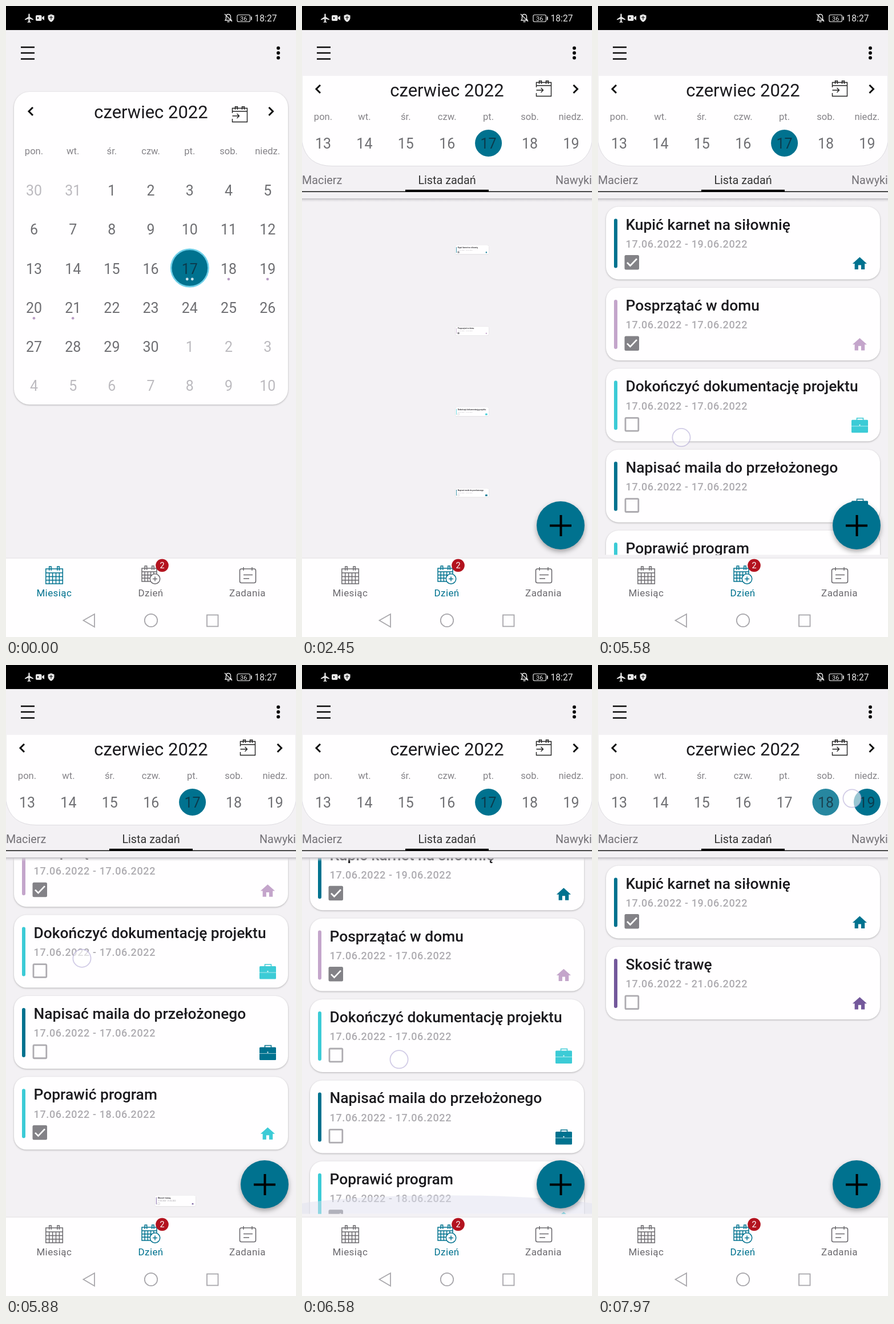
Animation of 508x1102 px, one loop 8 s. Source, as an HTML page:

```html
<!DOCTYPE html>
<html lang="pl">
<head>
<meta charset="utf-8">
<title>Kalendarz</title>
<style>
  html, body { margin: 0; width: 100%; height: 100%; overflow: hidden; background: #f3f1f4; }
  svg { display: block; width: 508px; height: 1102px; font-family: Roboto, "Noto Sans", sans-serif; }
  .c { text-anchor: middle; }
  .card { fill: #fffeff; filter: drop-shadow(0 1.5px 1.5px #0004); }
  .line { fill: none; stroke: currentColor; stroke-width: 1.5; }
  .title { font-weight: 500; }
  .date { font-weight: 500; letter-spacing: .65px; }
  .nav { letter-spacing: .4px; }
</style>
</head>
<body>
<svg id="stage" viewBox="0 0 508 1102"></svg>
<script>
const TEAL = '#00728f', CYAN = '#3ccbd6', MAUVE = '#c4a5cb', PURPLE = '#73589b';
const BG = '#f3f1f4', WHITE = '#fffeff', GREY = '#6f6f73', INK = '#0b3b4d';

const text = (x, y, s, size, fill, cls = 'c') =>
  `<text x="${x}" y="${y}" font-size="${size}" fill="${fill}" class="${cls}">${s}</text>`;
const rect = (x, y, w, h, fill, r = 0, more = '') =>
  `<rect x="${x}" y="${y}" width="${w}" height="${h}" rx="${r}" fill="${fill}" ${more}/>`;
const circle = (x, y, r, fill, more = '') => `<circle cx="${x}" cy="${y}" r="${r}" fill="${fill}" ${more}/>`;
const path = (d, more = 'class="line"') => `<path d="${d}" ${more}/>`;
const group = (id, body, more = '') => `<g id="${id}" ${more}>${body}</g>`;
const at = (x, y, body, k = 1) => `<g transform="translate(${x} ${y}) scale(${k})">${body}</g>`;
const stroke = (color, w) => `fill="none" stroke="${color}" stroke-width="${w}"`;

const WEEKDAYS = ['pon.', 'wt.', 'śr.', 'czw.', 'pt.', 'sob.', 'niedz.'];
const weekdays = (x, step, y) =>
  WEEKDAYS.map((d, i) => text(x + step * i, y, d, 16.6, '#858388')).join('');
const chevrons = (l, r, y) =>
  path(`M${l + 4} ${y - 7}l-7 7l7 7M${r - 4} ${y - 7}l7 7l-7 7`, stroke('#111', 3));
const todayIcon = path('M0 12V3.5H26V27.5H0V22M0 9H26M5 0V6M9 0V6M17 0V6M21 0V6M5 1H9M17 1H21M0 17H12M8 13L12 17L8 21',
  stroke('#222', 1.4));

function statusBar() {
  const plane = 'M21 16v-2l-8-5V3.5c0-.83-.67-1.5-1.5-1.5S10 2.67 10 3.5V9l-8 5v2l8-2.5V19l-2 1.5V22l3.5-1 3.5 1v-1.5L13 19v-5.5z';
  const light = '#e8e8e8', fill = `fill="${light}"`;
  return rect(0, 0, 508, 42, '#000')
    + at(31.5, 12, path(plane, fill), .78)
    + rect(52, 16, 10.5, 10, light, 2) + path('M63 20l4-3v8l-4-3z', fill) + circle(56, 21, 1.4, '#000')
    + path('M79 14.5l5.5 2v5q-1 4-5.5 6.5q-4.5-2.500-5.500-6.500v-5z', fill) + path('M76 20h6M79 17v7', stroke('#000', 1))
    + path('M384 25h11l-1.500-2.500v-4q-.5-4-4-4q-4 0-4 4v4zM387.500 27.500h4M383 14l13 13', stroke(light, 1.4))
    + rect(405, 15.500, 22.500, 12, 'none', 2.5, `stroke="${light}" stroke-width="1.2"`)
    + rect(429, 18.500, 1.8, 6, light) + text(416.2, 25.500, '36', 11, light) + text(455, 27.2, '18:27', 15.6, light);
}

const appBar = path('M26 72H50M26 82H50M26 92.500H50', stroke('#0a0a0a', 2.7))
  + [73.5, 82, 90.5].map(y => circle(477, y, 3, '#0a0a0a')).join('');

function monthView() {
  let s = rect(14, 150, 480, 546, WHITE, 27, 'class="card"')
    + chevrons(43, 464.5, 184) + text(254, 196, 'czerwiec 2022', 31, '#1c1b1f')
    + at(396.5, 175, todayIcon) + weekdays(49, 68.2, 259);
  for (let i = 0; i < 42; i++) {
    const n = i - 1, x = 49 + 68.2 * (i % 7), y = 322 + 68.25 * Math.floor(i / 7);
    const inside = n > 0 && n < 31, day = n < 1 ? n + 31 : n > 30 ? n - 30 : n;
    const today = n === 17;
    if (today) s += circle(x, 457.5, 34, '#6fcfe8') + circle(x, 457.5, 31.3, TEAL);
    s += text(x, y + 9, day, 25, today ? INK : inside ? GREY : '#bcbabf');
    if (today) s += circle(x - 4.5, 477, 2.4, '#c9e2e9') + circle(x + 4.5, 477, 2.4, '#c9e2e9');
    if (n > 17 && n < 22) s += circle(x, y + 18.5, 2.3, '#b99cc4');
  }
  return s;
}

function weekView() {
  let s = rect(0, 121, 508, 844, BG);
  s += group('list', '', 'clip-path="url(#clip)"');
  s += rect(0, 279, 508, 58, BG) + rect(0, 336, 508, 7, 'url(#fade)')
    + path('M0 121.500H508V238Q500 279.500 455 279.500H53Q8 279.500 0 238z', `fill="${WHITE}" stroke="#dddbe0" stroke-width="1"`)
    + rect(0, 120, 508, 2, BG)
    + chevrons(28, 479.5, 145) + text(254, 157.5, 'czerwiec 2022', 31, '#1c1b1f')
    + at(410.5, 130, todayIcon) + weekdays(37, 72.4, 199);
  for (let i = 0; i < 7; i++) {
    const x = 37 + 72.4 * i, d = 13 + i;
    s += text(x, 249, d, 25, GREY)
      + group('day' + d, circle(x, 239.5, 23.5, TEAL) + text(x, 249, d, 25, INK), 'opacity="0"');
  }
  return s + text(0, 311, 'Macierz', 19.8, '#737176', '') + text(254, 311, 'Lista zadań', 19.8, '#333')
    + text(444, 311, 'Nawyki', 19.8, '#737176', '')
    + rect(0, 323.5, 508, 1.5, '#111') + rect(181, 320.8, 146, 3.7, '#000')
    + group('fab', circle(453, 907, 42, TEAL, 'style="filter:drop-shadow(0 4px 4px #0005)"')
      + path('M434 907.500H472M453.500 889V926', stroke('#000', 4)));
}

const house = color => at(443.3, 84.3, path('M10 20v-6h4v6h5v-8h3L12 3 2 12h3v8z', `fill="${color}"`), 1.26);
const briefcase = color => rect(444, 89.5, 29, 22.5, color, 1.5)
  + path('M453.500 90V86.500H464.500V90', stroke(color, 1.5))
  + path('M444 100.500H473', stroke('#fff9', 1)) + circle(458.5, 98.5, 1.1, '#fff');

function card([title, end, color, done, work]) {
  const box = done
    ? rect(46.5, 84.500, 25.5, 25.5, '#838287', 2.5) + path('M51 97.500L56.500 103L68 91', stroke('#fff', 2.7))
    : rect(48, 86, 22.8, 22.8, 'none', 1.5, 'stroke="#adabb0" stroke-width="2.8"');
  return rect(14, 0, 480, 127, WHITE, 22, 'class="card"') + rect(28, 21, 6, 86, color, 3)
    + text(48.5, 40, title, 26.4, '#1c1b1f', 'title')
    + text(48.5, 71.3, `17.06.2022 - ${end}.06.2022`, 18, '#adabb0', 'date')
    + box + (work ? briefcase : house)(color);
}

const TASKS = [
  ['Kupić karnet na siłownię', 19, TEAL, 1, 0],
  ['Posprzątać w domu', 17, MAUVE, 1, 0],
  ['Dokończyć dokumentację projektu', 17, CYAN, 0, 1],
  ['Napisać maila do przełożonego', 17, TEAL, 0, 1],
  ['Poprawić program', 18, CYAN, 1, 0],
  ['Skosić trawę', 21, PURPLE, 0, 0],
];

function grid(w, h) {
  let d = `M0 4H${w}V${h}H0zM0 ${h * .37}H${w}`;
  for (let i = 1; i < 5; i++) d += `M${w * i / 5} ${h * .37}V${h}`;
  for (let i = 1; i < 3; i++) d += `M0 ${h * (.37 + .21 * i)}H${w}`;
  const ring = x => `M${x} 7V0H${x + 3.5}V7`;
  return path(d + ring(w * .2) + ring(w * .68));
}

function bottomNav() {
  const label = (x, s) => text(x, 1031, s, 17, 'currentColor', 'c nav');
  return rect(0, 963.5, 508, 2, '#e9e7ea') + rect(0, 965, 508, 137, WHITE)
    + group('navMonth', at(69.8, 979, grid(29.5, 30)) + label(84.3, 'Miesiąc'))
    + group('navDay', at(238, 978, grid(26, 27))
      + circle(261, 1000.5, 8.7, WHITE, 'stroke="currentColor" stroke-width="1.5"')
      + path('M257 1000.500H265M261 996.500V1004.500') + label(253.6, 'Dzień'))
    + `<g color="#6b696e">${rect(409.5, 983, 28, 24.5, 'none', 3, 'stroke="currentColor" stroke-width="1.6"')}`
    + path('M416 980V986M431 980V986M416 993.500H432M416 1000H426') + label(423, 'Zadania') + '</g>'
    + circle(273.5, 977, 11.3, '#b3131f') + text(273.5, 982, '2', 14.5, '#fff')
    + path('M135.500 1073L155 1062V1084.500z', stroke('#a9a7ac', 1.8))
    + circle(254, 1073, 11.2, 'none', 'stroke="#a9a7ac" stroke-width="1.8"')
    + rect(352, 1063.5, 19.5, 20, 'none', 0, 'stroke="#a9a7ac" stroke-width="1.8"');
}

stage.innerHTML = `<defs>
  <clipPath id="clip"><rect y="337" width="508" height="621.500"/></clipPath>
  <linearGradient id="fade" x2="0" y2="1"><stop stop-color="#bdbbc0"/><stop offset="1" stop-color="#e9e7ea" stop-opacity="0"/></linearGradient>
  </defs>` + rect(0, 0, 508, 1102, BG) + group('month', monthView()) + group('week', weekView())
  + appBar + bottomNav() + statusBar()
  + circle(0, 0, 15.6, '#fff9', 'id="touch" stroke="#b3abd699" stroke-width="1.8"');

const $ = id => document.getElementById(id);
$('list').innerHTML = TASKS.map((task, i) => group('task' + i, card(task))).join('')
  + '<ellipse id="glow" cx="254" cy="959" rx="310" fill="#dfe2f0" opacity=".5"/>';

const clamp = v => Math.max(0, Math.min(1, v));
const ramp = (t, start, length) => clamp((t - start) / length);
const ease = p => (1 - Math.cos(Math.PI * p)) / 2;

// keys: [time, value, value...]; linear between neighbours
function follow(t, keys, k = 1) {
  let i = 1;
  while (i < keys.length - 1 && t > keys[i][0]) i++;
  const a = keys[i - 1], b = keys[i];
  return a[k] + (b[k] - a[k]) * ramp(t, a[0], b[0] - a[0]);
}

const TOUCHES = [
  [[1490, 318, 452], [2170, 318, 452]],
  [[5580, 146, 754], [5640, 144, 728], [5880, 133, 513], [5970, 131, 440]],
  [[6390, 160, 470], [6430, 162, 498], [6580, 170, 688], [6670, 173, 760]],
  [[7330, 393, 236], [7450, 393, 236]],
  [[7850, 445, 233], [8000, 445, 233]],
];
const SCROLL = [[5620, 0], [5700, 30], [5880, 196], [5930, 233], [6420, 233], [6580, 50], [6650, 0]];
const GLOW = [[5930, 0], [6050, 50], [6360, 45], [6580, 33], [6720, 0]];
const FADE_START = 1970, SELECT_18 = 7470, SELECT_19 = 7940;

function draw(t) {
  const p = ramp(t, FADE_START, 380);
  $('month').setAttribute('opacity', 1 - p);
  $('week').setAttribute('opacity', p);
  $('fab').setAttribute('transform', `translate(0 ${160 * (1 - p)})`);
  $('navMonth').setAttribute('color', p ? '#6b696e' : TEAL);
  $('navDay').setAttribute('color', p ? TEAL : '#6b696e');

  $('day17').setAttribute('opacity', 1 - ramp(t, SELECT_18, 180));
  $('day18').setAttribute('opacity', t < SELECT_18 ? 0 : 1 - ramp(t, SELECT_19, 200));
  $('day19').setAttribute('opacity', t < SELECT_19 ? 0 : 1);

  const day = t < SELECT_18 ? 17 : t < SELECT_19 ? 18 : 19;
  const scroll = follow(t, SCROLL);
  let row = 0;
  TASKS.forEach((task, i) => {
    const shown = task[1] >= day, k = ease(ramp(t, i < 5 ? 2360 : 5780, 400));
    const el = $('task' + i);
    el.style.display = shown && k > 0 ? '' : 'none';
    if (!shown) return;
    const y = 350.5 + 141.4 * row++ - scroll;
    el.setAttribute('transform', `translate(${304 * (1 - k)} ${y + 77 * (1 - k)}) scale(${k})`);
  });
  $('glow').setAttribute('ry', follow(t, GLOW));

  const keys = TOUCHES.findLast(touch => t >= touch[0][0]);
  const touch = $('touch');
  touch.setAttribute('opacity', keys ? 1 - ramp(t, keys.at(-1)[0], 70) : 0);
  if (keys) touch.setAttribute('transform', `translate(${follow(t, keys)} ${follow(t, keys, 2)})`);
}

function tick() {
  draw(performance.now() % 8000);
  requestAnimationFrame(tick);
}
tick();
</script>
</body>
</html>
```
